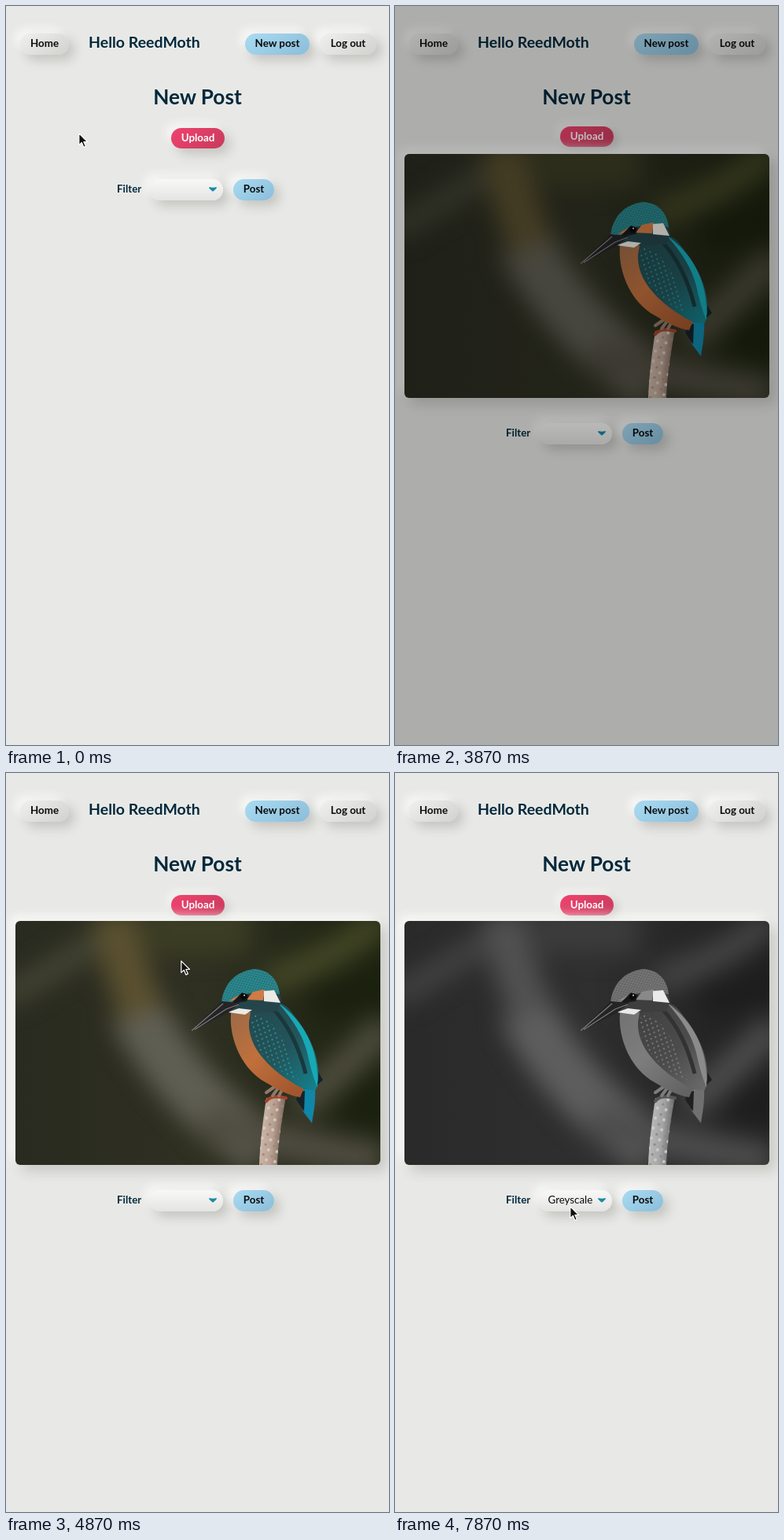
Recreate the animation shown at these times as an HTML page. Size 487 px wide and 939 px high, loop 8000 ms.

```html
<!DOCTYPE html>
<html lang="en">
<head>
<meta charset="utf-8">
<title>New Post</title>
<style>
  html, body { margin: 0; width: 100%; height: 100%; overflow: hidden; }
  body { background: #e8e9e6; }
  #stage {
    position: relative; width: 487px; height: 939px; overflow: hidden;
    background: #e8e9e6; color: #03283c;
    font: 700 13.33px/24px Lato, "Open Sans", sans-serif;
  }
  #stage * { box-sizing: border-box; }
  #stage > *, .row > * { position: absolute; white-space: nowrap; }

  /* every animation shares the 8 s clock; 1% = 80 ms */
  .anim { animation: 8s step-end -4ms infinite; }

  .btn {
    height: 27px; border-radius: 14px; text-align: center; color: #0a0b0c;
    background: linear-gradient(145deg, #f0f0ee, #d1d2cd);
    box-shadow: 7px 7px 14px rgba(70, 70, 60, .22), -7px -7px 12px rgba(255, 255, 255, .62);
  }
  .blue { background: linear-gradient(145deg, #a9dbf2, #8bbdd9); }
  .red { background: linear-gradient(145deg, #f0436f, #c73a5b); color: #fff; }

  .hello { left: 105px; top: 34px; font-size: 19.5px; }
  .title { left: 0; width: 487px; top: 103px; margin: 0; font-size: 26.2px; text-align: center; }

  .upload { left: 210px; top: 155px; width: 68px; height: 26px; animation-name: lift; }
  @keyframes lift {
    0% { transform: none; }
    10% { transform: translateY(-2px); }
    14.125% {
      transform: translateY(-2px);
      box-shadow: 5px 5px 12px rgba(70, 70, 60, .18), -6px -6px 11px rgba(255, 255, 255, .45);
    }
    50%, 100% { transform: none; }
  }

  .photo {
    left: 12px; top: 188px; width: 464px; height: 310px; border-radius: 6px; overflow: hidden;
    box-shadow: 8px 8px 16px rgba(70, 70, 60, .2), -7px -7px 14px rgba(255, 255, 255, .75);
    animation-name: load;
  }
  .photo svg { display: block; animation-name: grey; }
  @keyframes load { 0% { visibility: hidden; } 48.375%, 100% { visibility: visible; } }
  @keyframes grey { 0% { filter: none; } 86.625%, 100% { filter: grayscale(1); } }

  .row { left: 0; top: 220px; width: 487px; height: 27px; animation-name: drop; }
  @keyframes drop { 0% { transform: none; } 48.375%, 100% { transform: translateY(310px); } }
  .label { left: 141px; top: 0; }
  .select {
    left: 182px; top: 0; width: 94px; height: 27px; padding-left: 12.5px; text-align: left;
    font-weight: 400; background: linear-gradient(#f8f8f7, #e4e5e2);
  }
  .select span { animation-name: pick; }
  .select svg { position: absolute; left: 76px; top: 10px; }
  @keyframes pick { 0% { visibility: hidden; } 86.625%, 100% { visibility: visible; } }

  .menu {
    left: 182px; top: 557px; width: 94px; height: 95px; margin: 0; padding: 0; list-style: none;
    background: #fdfef9; border: 1px solid #7fa3bf; color: #131618;
    font-weight: 400; line-height: 17px;
    box-shadow: 5px 5px 14px rgba(70, 70, 60, .2);
    animation-name: open;
  }
  .menu li { height: 19px; padding-left: 12.5px; }
  .menu li:first-child { height: 17px; animation-name: leave; }
  .menu li:nth-child(2) { animation-name: enter; }
  @keyframes open { 0%, 86.625%, 100% { visibility: hidden; } 76.625% { visibility: visible; } }
  @keyframes leave { 0% { background: #109df1; } 82.5%, 100% { background: none; } }
  @keyframes enter { 0% { background: none; } 82.5%, 100% { background: #109df1; color: #fff; } }

  .dim { inset: 0; background: #000; animation-name: dim; }
  @keyframes dim {
    0% { opacity: 0; }
    15.875% { opacity: 0; animation-timing-function: steps(8, jump-both); }
    22.5% { opacity: .3; }
    48.375% { opacity: .255; }
    49.17% { opacity: .17; }
    50% { opacity: .095; }
    50.83% { opacity: .035; }
    51.625%, 100% { opacity: 0; }
  }

  .cursor { left: 0; top: 0; overflow: visible; animation-name: move, hide; }
  @keyframes hide { 0%, 57.5%, 100% { visibility: visible; } 15.875% { visibility: hidden; } }
  @keyframes move {
    0% { transform: translate(92px, 161px); }
    5% { transform: translate(92px, 161px); animation-timing-function: steps(5, jump-both); }
    10% { transform: translate(250px, 167px); }
    57.5% { transform: translate(162px, 96px); animation-timing-function: steps(4); }
    60.875% { transform: translate(222px, 238px); animation-timing-function: steps(5); }
    67.5% { transform: translate(249px, 485px); }
    69.125% { transform: translate(249px, 485px); animation-timing-function: steps(4, jump-both); }
    74.125% { transform: translate(212px, 553px); }
    81.625% { transform: translate(212px, 553px); animation-timing-function: steps(2, jump-both); }
    84.125% { transform: translate(200px, 580px); }
    90.875% { transform: translate(206px, 560px); }
    91.625% { transform: translate(217px, 538px); }
    94.125% { transform: translate(191px, 551px); }
    95.875% { transform: translate(200px, 559px); }
    96.625% { transform: translate(213px, 553px); }
    98.375%, 100% { transform: translate(222px, 550px); }
  }
</style>
</head>
<body>
<div id="stage">
  <div class="btn" style="left:18px;top:35px;width:62px">Home</div>
  <div class="hello">Hello ReedMoth</div>
  <div class="btn blue" style="left:304px;top:35px;width:82px">New post</div>
  <div class="btn" style="left:399px;top:35px;width:72px">Log out</div>
  <h1 class="title">New Post</h1>
  <div class="btn red upload anim">Upload</div>

  <div class="photo anim">
    <svg class="anim" width="464" height="310" viewBox="12 188 464 310">
      <defs>
        <filter id="soft" filterUnits="userSpaceOnUse" x="-60" y="110" width="610" height="460" color-interpolation-filters="sRGB">
          <feGaussianBlur stdDeviation="15"/>
        </filter>
        <filter id="crisp" color-interpolation-filters="sRGB"><feGaussianBlur stdDeviation=".5"/></filter>
        <linearGradient id="wood" x2="1" y2=".2">
          <stop stop-color="#d2c0b2"/><stop offset=".6" stop-color="#b69f90"/><stop offset="1" stop-color="#756357"/>
        </linearGradient>
        <linearGradient id="breast" x2=".8" y2="1">
          <stop stop-color="#9a6a48"/><stop offset=".5" stop-color="#c0703c"/><stop offset="1" stop-color="#a2562e"/>
        </linearGradient>
        <linearGradient id="wing" x2="1" y2="1">
          <stop stop-color="#23474c"/><stop offset=".55" stop-color="#22565c"/><stop offset="1" stop-color="#128490"/>
        </linearGradient>
        <pattern id="dots" width="8" height="9" patternUnits="userSpaceOnUse" patternTransform="rotate(25)">
          <circle cx="2" cy="2" r="1" fill="#2ba5aa"/><circle cx="6" cy="6.5" r=".9" fill="#2ba5aa"/>
        </pattern>
        <pattern id="flecks" width="5" height="4" patternUnits="userSpaceOnUse" patternTransform="rotate(-25)">
          <path d="M0 1h2.6M2.5 3h2.5" stroke="#4fa0a2" stroke-width=".9"/>
        </pattern>
        <pattern id="bark" width="11" height="13" patternUnits="userSpaceOnUse" patternTransform="rotate(12)">
          <circle cx="3" cy="3" r="1.6" fill="#a88070"/><circle cx="8" cy="9" r="1.9" fill="#d9cbbf"/>
        </pattern>
        <linearGradient id="shade">
          <stop stop-color="#2a2b20"/><stop offset=".5" stop-color="#2f3022"/><stop offset="1" stop-color="#1d2310"/>
        </linearGradient>
      </defs>
      <path fill="url(#shade)" d="M12 188h464v310H12z"/>
      <g filter="url(#soft)" fill="none">
        <path stroke="#3c3e24" stroke-width="60" d="M180 200H310"/>
        <path stroke="#434434" stroke-width="30" d="M0 285L150 195"/>
        <path stroke="#454826" stroke-width="34" d="M330 265Q420 235 480 185"/>
        <path stroke="#4d4c3c" stroke-width="40" d="M370 425Q440 365 485 320"/>
        <path stroke="#605f54" stroke-width="70" d="M165 300Q190 350 230 395T330 480"/>
        <path stroke="#5b5130" stroke-width="56" d="M140 180Q145 240 175 305"/>
        <path stroke="#504d42" stroke-width="44" d="M250 440Q350 475 480 492"/>
        <path stroke="#1a200e" stroke-width="40" d="M390 285Q430 290 480 265M435 430L480 405"/>
      </g>
      <g filter="url(#crisp)">
        <path fill="url(#wood)" d="M331 413L356 411C350 445 346 470 345 498H322C323 470 327 440 331 413z"/>
        <path fill="url(#bark)" d="M331 413L356 411C350 445 346 470 345 498H322C323 470 327 440 331 413z"/>
        <path fill="none" stroke="#a3432a" stroke-width="4" stroke-linecap="round" d="M331 417Q338 408 356 413"/>
        <path fill="none" stroke="#8f7868" stroke-width="4" stroke-linecap="round" d="M331 406L344 397M339 410L347 399M347 410L352 401"/>
        <path fill="#1186a8" d="M375 402L393 400C394 418 391 432 389 445L377 429z"/>
        <path fill="#14232a" d="M392 372L403 390L396 396zM372 405L380 404L379 430L369 415z"/>
        <path fill="url(#breast)" d="M286 304C283 340 302 378 330 393C345 402 360 410 374 412L380 398L330 360L318 298z"/>
        <path fill="url(#wing)" d="M311 304C325 290 348 286 360 300C385 330 399 358 397 390L394 403C382 404 372 399 362 392C335 375 307 348 309 316z"/>
        <path fill="url(#dots)" d="M313 306C333 305 350 330 362 362L372 390C345 382 308 348 311 318z"/>
        <path fill="none" stroke="#1a383c" stroke-width="5" d="M340 300Q368 330 381 382"/>
        <path fill="#17a9b5" d="M346 292C378 314 399 350 396 400C390 385 386 370 383 355C377 333 366 315 346 292z"/>
        <path fill="#24454a" d="M275 290L284 304L311 304L345 303L350 290L347 278L304 278z"/>
        <path fill="#1d767d" d="M274 292C276 270 290 252 316 249C334 250 346 262 348 281L328 277L304 281L288 292z"/>
        <path fill="url(#flecks)" d="M274 292C276 270 290 252 316 249C334 250 346 262 348 281L328 277L304 281L288 292z"/>
        <path fill="#d27a43" d="M306 288L314 278L329 275L327 289zM283 290L296 282L294 288z"/>
        <path fill="#eceae4" d="M328 277L341 276L349 292L328 290zM282 304L296 299L313 301L304 307z"/>
        <path fill="#17191b" d="M286 293L300 279L309 282L306 290z"/>
        <circle cx="302" cy="284" r="4" fill="#080808"/><circle cx="303" cy="282.5" r=".9" fill="#fff"/>
        <path fill="#242427" d="M234 329L274 290L298 292L282 305z"/>
        <path fill="none" stroke="#7d7b78" stroke-width="1.3" d="M236 327.500L276 293M240 326L280 300L296 294"/>
      </g>
    </svg>
  </div>

  <div class="row anim">
    <div class="label">Filter</div>
    <div class="btn select"><span class="anim">Greyscale</span>
      <svg width="10" height="6"><path fill="#178ba6" d="M.5 0Q5 1.6 9.5 0Q10.4 1 9 2.2L5.8 5.2Q5 5.8 4.2 5.2L1 2.2Q-.4 1 .5 0z"/></svg>
    </div>
    <div class="btn blue" style="left:289px;top:0;width:52px">Post</div>
  </div>

  <ul class="menu anim">
    <li class="anim"></li><li class="anim">Greyscale</li><li>Bright</li><li>Saturate</li><li>Contrast</li>
  </ul>

  <div class="dim anim"></div>
  <svg class="cursor anim" width="13" height="20">
    <path fill="#111" stroke="#fff" stroke-width="1.2" stroke-linejoin="round" d="M.8.8V15.6L4.3 12.4L6.9 18.4L9.4 17.3L6.8 11.5H11.5z"/>
  </svg>
</div>
</body>
</html>
```
